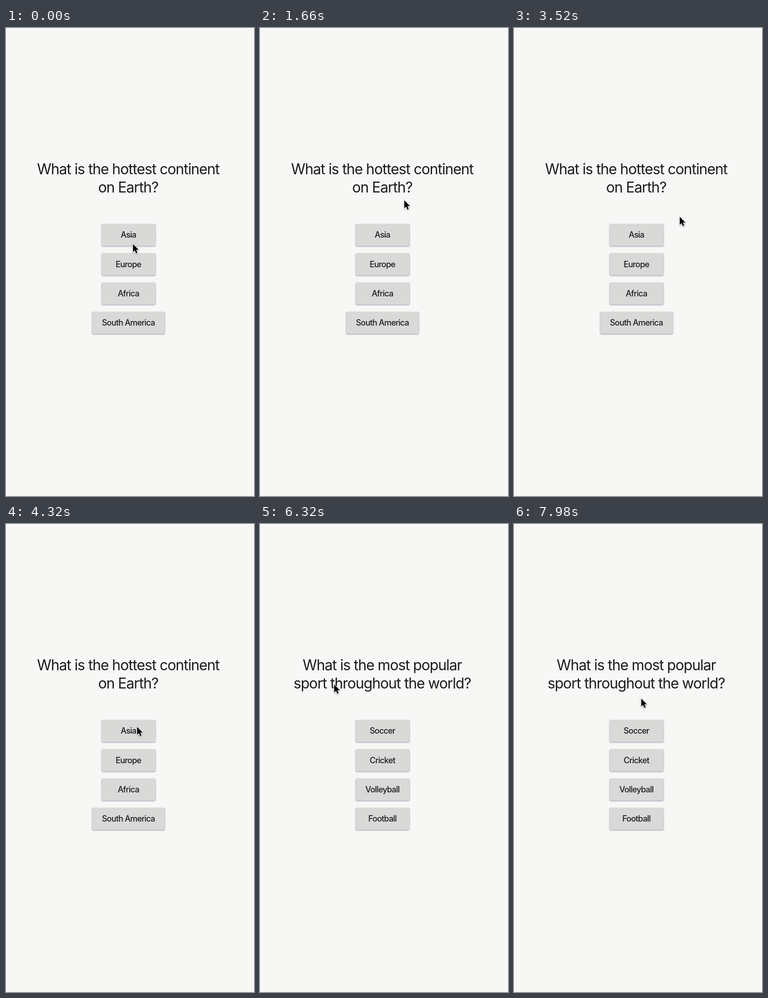
Write an HTML page that moves like this. It is 545 px wide and 1027 px high and loops after 8000 ms.

```html
<!DOCTYPE html>
<html lang="en">
<head>
<meta charset="utf-8">
<title>Quiz</title>
<style>
  html, body { margin: 0; width: 100%; height: 100%; overflow: hidden; background: #f7f7f5; }
  svg { display: block; width: 545px; height: 1027px; }
  text {
    font-family: Inter, "Liberation Sans", sans-serif;
    font-optical-sizing: none;
    text-anchor: middle;
    fill: #1c1c20;
  }
  .title { font-size: 32px; letter-spacing: -.036em; }
  .label { font-size: 18px; font-weight: 500; letter-spacing: -.044em; }
  .button {
    fill: #d9d9d8;
    filter: drop-shadow(0 1.5px .8px rgba(70, 70, 120, .4)) drop-shadow(0 1px 1.5px rgba(60, 60, 100, .2));
  }
  .cursor { filter: drop-shadow(0 1.5px 1.5px rgba(0, 0, 0, .35)); }
</style>
</head>
<body>
<svg viewBox="0 0 545 1027">
  <clipPath id="first"><rect x="210.5" y="430" width="118" height="48.3" rx="3"/></clipPath>
  <g id="quiz"></g>
  <g clip-path="url(#first)">
    <g transform="translate(287 447)"><circle id="ripple" r="100"/></g>
  </g>
  <g id="cursor">
    <path class="cursor" d="M0 0V17.6L4 13.9 6.8 20.5 9.8 19.2 7 12.8H12.5Z"
      stroke="#fff" stroke-width="2.2" stroke-linejoin="round" paint-order="stroke"/>
  </g>
</svg>
<script>
const LOOP = 8000, PRESS = 5180, SWAP = 5260, RELEASED = 5720;
const CENTER = 269.4, TOP = 430, PITCH = 64.25, HEIGHT = 48.3, MIN_WIDTH = 118, PADDING = 21.5;

const questions = [
  { title: ["What is the hottest continent", "on Earth?"],
    answers: ["Asia", "Europe", "Africa", "South America"] },
  { title: ["What is the most popular", "sport throughout the world?"],
    answers: ["Soccer", "Cricket", "Volleyball", "Football"] }
];

// time and pointer tip at each turn of its path
const turns = [
  [0, 279, 474], [1660, 317, 378], [2780, 347, 374], [3400, 370, 412],
  [4320, 288, 445], [5760, 288, 445], [6320, 163, 352], [LOOP, 280, 383]
];

const quiz = document.getElementById("quiz");

function add(parent, tag, attrs, content = "") {
  const el = document.createElementNS("http://www.w3.org/2000/svg", tag);
  for (const key in attrs) el.setAttribute(key, attrs[key]);
  el.textContent = content;
  return parent.appendChild(el);
}

function play(el, steps, easing = "linear") {
  el.animate(steps.map(([time, style]) => ({ offset: time / LOOP, easing, ...style })),
    { duration: LOOP, iterations: Infinity });
}

function drawButton(group, answer, i) {
  const y = TOP + i * PITCH;
  const box = add(group, "rect", { class: "button", y, height: HEIGHT, rx: 3 });
  const label = add(group, "text", { class: "label", x: CENTER - .4, y: y + 30.3 }, answer);
  const width = Math.max(MIN_WIDTH, label.getComputedTextLength() + 2 * PADDING);
  box.setAttribute("x", CENTER - width / 2);
  box.setAttribute("width", width);
}

questions.forEach(({ title, answers }, index) => {
  const group = add(quiz, "g", {});
  title.forEach((line, i) =>
    add(group, "text", { class: "title", x: CENTER - .8, y: 320.5 + i * 40 }, line));
  answers.forEach((answer, i) => drawButton(group, answer, i));

  const before = { opacity: 1 - index }, after = { opacity: index };
  play(group, [[0, before], [SWAP, before], [SWAP, after], [LOOP, after]]);
});

const spread = (size, opacity) => ({ transform: `scale(${size})`, opacity });
play(document.getElementById("ripple"), [
  [0, spread(0, 0)], [PRESS, spread(0, 0)], [PRESS, spread(0, .165)],
  [RELEASED, spread(1, 0)], [LOOP, spread(1, 0)]
]);

play(document.getElementById("cursor"),
  turns.map(([time, x, y]) => [time, { transform: `translate(${x}px, ${y}px)` }]),
  "cubic-bezier(.35, .1, .65, .9)");
</script>
</body>
</html>
```
